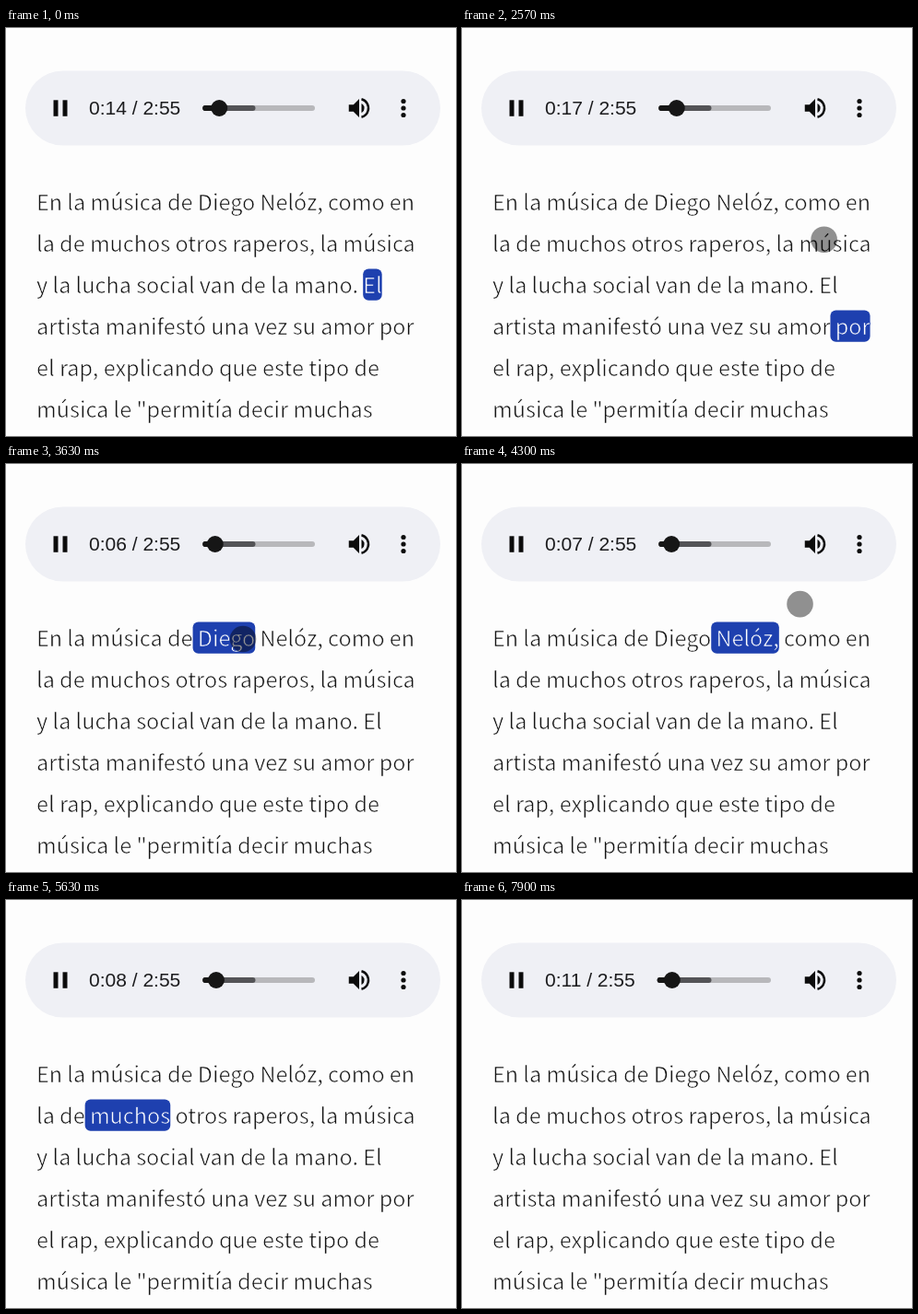
An HTML page with a canvas for the animation above (7.93 s loop, 488 by 443 pixels).

```html
<!DOCTYPE html>
<html lang="es">
<head>
<meta charset="utf-8">
<title>Lectura con audio</title>
<style>
html, body { margin: 0; width: 100%; height: 100%; overflow: hidden; background: #fdfdfd; }
canvas { display: block; width: 488px; height: 443px; }
</style>
</head>
<body>
<canvas id="stage"></canvas>
<script>
const W = 488, H = 443, LOOP = 7930;
const SEEK = 3320, DURATION = 175;
const PAGE = '#fdfdfd', INK = '#141414', MARK = '#1e40af';
const canvas = document.getElementById('stage');
const ctx = canvas.getContext('2d');
const dpr = window.devicePixelRatio || 1;
canvas.width = Math.round(W * dpr);
canvas.height = Math.round(H * dpr);

const LINES = [
  'En la música de Diego Nelóz, como en',
  'la de muchos otros raperos, la música',
  'y la lucha social van de la mano. El',
  'artista manifestó una vez su amor por',
  'el rap, explicando que este tipo de',
  'música le "permitía decir muchas'
];
const LEFT = 33, BASE = 198.3, LEADING = 45, COLUMN = 411;
const FAMILY = '"Noto Sans CJK JP Light", "Noto Sans CJK JP", "Noto Sans CJK SC", "Noto Sans CJK", "Open Sans", sans-serif';
const bodyFont = size => `300 ${size}px ${FAMILY}`;
const CLOCK_FONT = '21px "Liberation Sans", Arial, sans-serif';
const width = s => ctx.measureText(s).width;

// Pick the type size that gives the second line its column width.
ctx.font = bodyFont(24);
const BODY = bodyFont(24 * COLUMN / width(LINES[1]));

// Every word with its place on the page.
ctx.font = BODY;
const WORDS = LINES.flatMap((text, line) => text.split(' ').map((word, i, all) => {
  const before = all.slice(0, i).join(' ');
  const x = LEFT + (i ? width(before + ' ') : 0);
  // The mark covers the space before a word, except where a sentence starts.
  const left = before.endsWith('.') ? x : LEFT + width(before);
  return { word, x, y: BASE + line * LEADING, left, right: x + width(word) };
}));

// Phrases read aloud; inside each one a word lasts in proportion to its letters.
const PHRASES = [
  { from: 0, to: 1780, first: 23, count: 4 },
  { from: 1780, to: 3050, first: 27, count: 6 },
  { from: 3380, to: 4460, first: 4, count: 2 },
  { from: 4560, to: 6880, first: 6, count: 7 },
  { from: 7040, to: 7740, first: 13, count: 2 }
];

function spokenWord(t) {
  const phrase = PHRASES.find(p => t >= p.from && t < p.to);
  if (!phrase) return null;
  const words = WORDS.slice(phrase.first, phrase.first + phrase.count);
  const letters = words.reduce((n, w) => n + w.word.length, 0);
  let left = (t - phrase.from) / (phrase.to - phrase.from) * letters;
  return words.find(w => (left -= w.word.length) < 0);
}

function box(x, y, w, h, r, color) {
  ctx.fillStyle = color;
  ctx.beginPath();
  ctx.roundRect(x, y, w, h, r);
  ctx.fill();
}

function dot(x, y, r, color) {
  ctx.fillStyle = color;
  ctx.beginPath();
  ctx.arc(x, y, r, 0, Math.PI * 2);
  ctx.fill();
}

// Light type: the outline is trimmed with the colour behind it.
function lightText(s, x, y, color, behind) {
  ctx.fillStyle = color;
  ctx.fillText(s, x, y);
  ctx.strokeStyle = behind;
  ctx.lineWidth = 0.65;
  ctx.lineJoin = 'round';
  ctx.strokeText(s, x, y);
}

function drawSpeaker(x, y) {
  ctx.save();
  ctx.translate(x, y);
  ctx.scale(1.25, 1.25);
  ctx.fillStyle = ctx.strokeStyle = '#0c0c0c';
  ctx.fill(new Path2D('M-9-3v6h4l5 5V-8l-5 5z'));
  ctx.beginPath();
  ctx.arc(0, 0, 4.5, -1.11, 1.11);
  ctx.fill();
  ctx.lineWidth = 2;
  ctx.beginPath();
  ctx.arc(0, 0, 8, -1.32, 1.32);
  ctx.stroke();
  ctx.restore();
}

function drawPlayer(t) {
  const sec = t / 1000 + (t < SEEK ? 14.5 : 3.3);
  box(21, 46.5, 450, 81, 40.5, '#eff0f5');
  for (const x of [51.5, 61.5]) box(x, 78.3, 5, 17.5, 0, '#0c0c0c');

  const label = `0:${String(Math.floor(sec)).padStart(2, '0')} / 2:55`;
  ctx.font = CLOCK_FONT;
  ctx.fillStyle = '#1c1c1e';
  ctx.fillText(label, 90, 94);

  const x = 90 + width(label) + 24, end = 335;
  const knob = x + 9.4 + sec / DURATION * (end - x - 18);
  box(x, 84, end - x, 6, 3, '#b8b8bb');
  box(x, 84, 270.5 - x, 6, 3, '#545457');
  box(x, 84, knob - x, 6, 3, '#161616');
  dot(knob, 87, 9, '#161616');

  drawSpeaker(383, 87);
  for (const dy of [-7.5, 0, 7.5]) dot(431, 87 + dy, 2.6, '#0c0c0c');
}

function drawText(t) {
  ctx.font = BODY;
  LINES.forEach((s, i) => lightText(s, LEFT, BASE + i * LEADING, INK, PAGE));
  const w = spokenWord(t);
  if (!w) return;
  box(w.left, w.y - 26.8, w.right - w.left, 34.3, 6, MARK);
  lightText(w.word, w.x, w.y, '#fff', MARK);
}

const part = (t, from, to) => Math.min(1, Math.max(0, (t - from) / (to - from)));

// The pointer glides in from the right, presses a word and curves away.
function drawPointer(t) {
  if (t < 2450 || t > 4650) return;
  const away = 1 - part(t, 2450, 2920);
  const leave = part(t, 3880, 4650) ** 1.34;
  const x = 257 + 246 * (away ** 2 + leave);
  const y = 190 + 72 * away ** 2 - 40 * (1 - (1 - leave) ** 5);
  const pressed = t > 3040 && t < SEEK + 60;
  dot(x, y, 14.3, `rgba(0,0,0,${pressed ? 0.52 : 0.43})`);
}

function draw() {
  const t = performance.now() % LOOP;
  ctx.setTransform(dpr, 0, 0, dpr, 0, 0);
  ctx.fillStyle = PAGE;
  ctx.fillRect(0, 0, W, H);
  drawPlayer(t);
  drawText(t);
  drawPointer(t);
  requestAnimationFrame(draw);
}
draw();
</script>
</body>
</html>
```
